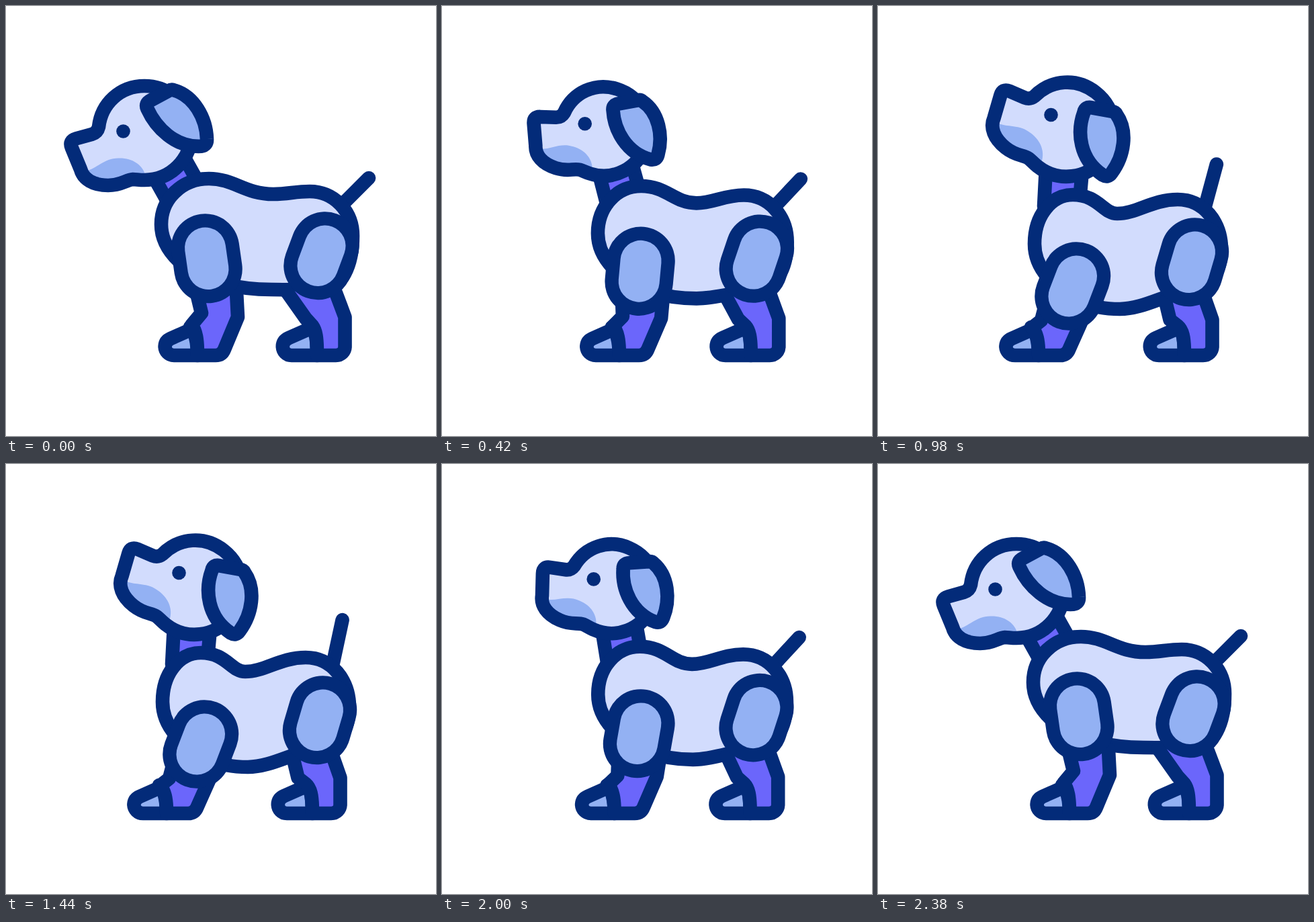
Animation, 640 px wide and 640 px high, one loop 2.4 s. Source, as an HTML page:

```html
<!DOCTYPE html>
<html lang="en">
<head>
<meta charset="utf-8">
<title>Robot dog</title>
<style>
  html, body { margin: 0; width: 100%; height: 100%; overflow: hidden; background: #fff; }
  svg { display: block; width: 100vw; height: 100vh; }

  /* Every part morphs from its standing outline (--a) to its raised one (--b). */
  path {
    d: var(--a);
    fill: none;
    stroke: #032b79;
    stroke-width: 20.6;
    stroke-linecap: round;
    stroke-linejoin: round;
    animation: pose 2.4s cubic-bezier(.8, 0, .2, 1) infinite;
  }
  .light { fill: #d2dcfd; }
  .mid { fill: #93b1f3; }
  .purple { fill: #6b66fb; }
  .flat { stroke: none; }
  .rim { stroke-width: 101.5; }
  .pad { stroke-width: 61; stroke: #93b1f3; }
  .tail { animation-name: wag; }

  @keyframes pose {
    0%, .83% { d: var(--a); }
    34.8%, 68.33% { d: var(--b); }
    100% { d: var(--a); }
  }
  @keyframes wag {
    0%, .83% { d: var(--a); }
    34.8% { d: var(--b); animation-timing-function: ease-in-out; }
    42.9% { d: var(--up); animation-timing-function: ease-in-out; }
    51.67% { d: var(--b); animation-timing-function: ease-in-out; }
    60.4% { d: var(--up); animation-timing-function: ease-in-out; }
    68.33% { d: var(--b); }
    100% { d: var(--a); }
  }
</style>
</head>
<body>
<svg viewBox="0 0 640 640">
  <path class="tail" style='
    --a: path("M500 296L540 256");
    --b: path("M489 302L526.5 259.3");
    --up: path("M486 300L500.5 232")'/>

  <!-- neck -->
  <path class="purple" style='
    --a: path("M218 251L246 301L292 273L264 223Z");
    --b: path("M250 240L247 298L300 290L304 245Z")'/>

  <!-- body -->
  <path class="light" style='
    --a: path("M231 325C231 287 262 257 302 257C340 257 355 280 398 280C420 280 430 276 452 276C488 276 516 305 516 342C516 385 500 422 470 422C445 423 420 422 395 422C370 422 345 419 320 413C270 400 231 365 231 325Z");
    --b: path("M233 354C233 312 258 281 290 281C328 281 335 309 356 309C385 309 408 288 446 288C485 288 511 322 511 362C511 400 490 425 460 425C430 428 395 451 360 451C340 451 320 448 305 440C260 420 233 390 233 354Z")'/>

  <!-- rear leg -->
  <path class="mid" style='
    --a: path("M455 479L421 494Q412 498 411.8 506.5C411.8 514 417.5 520 425 520L463 520C463 495 461 485 455 477Z");
    --b: path("M448 479L414 494Q405 498 404.8 506.5C404.8 514 410.5 520 418 520L456 520C456 495 454 485 448 477Z")'/>
  <path class="purple" style='
    --a: path("M417 424L446 465L456 476C461 483 463 492 463 520L491 520C498.5 520 504.5 514 504.5 507L504.5 463L491 427");
    --b: path("M428 440L434.5 467L446 476C453 482 456 492 456 520L484 520C491.5 520 497.5 514 497.5 507L497.5 467L487 437")'/>
  <g style='
    --a: path("M475 357L464 386.5");
    --b: path("M471.5 366L462.5 396.5")'>
    <path class="rim"/>
    <path class="pad"/>
  </g>

  <!-- front leg -->
  <path class="mid" style='
    --a: path("M272 483L245 495Q237 498.5 236.6 506.5C236.6 514 242.5 520 250 520L285 520C285 500 282 486 274 478Z");
    --b: path("M226 483L199 495Q191 498.5 190.4 506.5C190.4 514 196.5 520 204 520L239 520C239 500 236 486 228 478Z")'/>
  <path class="purple" style='
    --a: path("M284 428L291 457L276 475C283 483 285 497 285 520L312 520Q321.5 520 325 511L345 463L343 425");
    --b: path("M249 445L243 468L229 479C236 485 239 498 239 520L271 520Q281 520 284.8 510L304 467L312 448")'/>
  <g style='
    --a: path("M296.5 360L301 391.5");
    --b: path("M295.5 402L284 432")'>
    <path class="rim"/>
    <path class="pad"/>
  </g>

  <!-- head -->
  <g style='
    --a: path("M104.3 197.4L128 190.8Q136 188.5 138 180C142 145 170 119 206 119C245 119 276 150 276 189C276 228 245 259 206 259C198 259 194 258 189 258C178 259 172 267 152 267C130 267 115 258 111 243L97.7 210.8Q93.4 200.4 104.3 197.4Z");
    --b: path("M195.8 126.8L218.4 136.4Q226.2 139.6 233 134.2C257.9 109.3 296 106.4 324.2 128.8C354.7 153 359.7 196.6 335.4 227.1C311.1 257.7 267.6 262.7 237 238.4C230.8 233.4 228.3 230.1 224.4 227C215.1 220.9 205.5 223.5 189.8 211C172.6 197.3 166.4 180.9 172.6 166.7L182.3 133.2Q185.4 122.3 195.8 126.8Z")'>
    <path class="light flat"/>
    <path class="mid flat" style='
      --a: path("M118 246C136 242 146 226 168 226.5C188 226 202 236 207 250L206 259L189 258C178 259 172 267 152 267C130 267 115 258 111 243Z");
      --b: path("M176.3 173.4C192.9 181.5 210.6 175.2 227.5 189.2C243.5 201.3 248.3 217.8 243.5 232L237 238.4L224.4 227C215.1 220.9 205.5 223.5 189.8 211C172.6 197.3 166.4 180.9 172.6 166.7Z")'/>
    <path/>
  </g>
  <!-- eye -->
  <path style='
    --a: path("M174.5 186.5L174.51 186.5");
    --b: path("M257.5 162L257.51 162")'/>
  <!-- ear -->
  <path class="mid" style='
    --a: path("M210.3 153Q206.5 145 215.3 140.5L242.5 126Q246.5 123.5 250 125.3C280 134 298 167 299 198Q299.6 207.5 290.5 208.8C252 211 223 181 210.3 153Z");
    --b: path("M306.5 158Q308.4 149.3 318.1 151.3L348.5 157Q353.1 157.4 354.8 161C372.8 186.5 366.3 223.6 347.8 248.4Q342.4 256.3 334.5 251.6C300 228.5 295.5 188 306.5 158Z")'/>
</svg>
</body>
</html>
```
